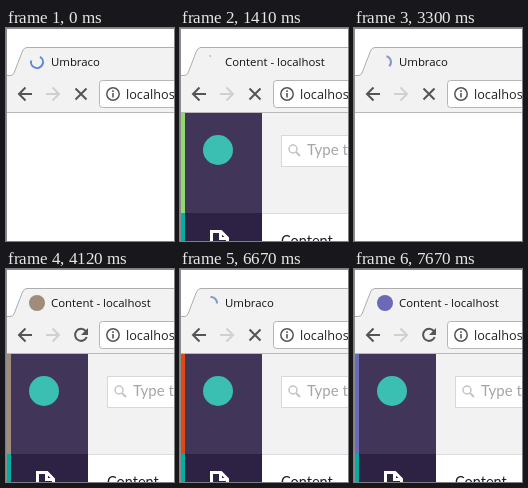
Animation, 168 px wide and 213 px high, one loop 8 s. Source, as an HTML page:

```html
<!DOCTYPE html>
<html lang="en">
<head>
<meta charset="utf-8">
<title>Tab colours</title>
<style>
html, body { margin: 0; width: 100%; height: 100%; overflow: hidden; background: #fff; }
svg { display: block; width: 168px; height: 213px; }
.ui { font-family: "Open Sans", "Noto Sans", sans-serif; }
.page { font-family: Lato, sans-serif; }
.line { fill: none; stroke-width: 2; }
</style>
</head>
<body>
<svg viewBox="0 0 168 213">
  <rect width="168" height="213" fill="#fff"/>

  <!-- browser tab and toolbar -->
  <path d="M1 47.5H4Q7 47.5 8 45L16.500 23Q18 19.500 21 19.500H169V85H1Z" fill="#f2f2f2"/>
  <path d="M1 47.500H4Q7 47.500 8 45L16.500 23Q18 19.500 21 19.500H169" fill="none" stroke="#adadad"/>
  <path d="M1 84.500H168" stroke="#b9b9b9"/>
  <circle id="favicon" cx="31" cy="34" r="8"/>
  <path id="spinner" class="line"/>
  <text id="title" class="ui" x="45" y="38" font-size="11.4" fill="#111"></text>

  <path class="line" d="M26 66H13.500M19.500 59.500L13 66L19.500 72.500" stroke="#555"/>
  <path class="line" d="M40 66H52.500M46.500 59.500L53 66L46.500 72.500" stroke="#d0d0d0"/>
  <path id="stop" class="line" d="M69.500 60.500L80.500 71.500M80.500 60.500L69.500 71.500" stroke="#555"/>
  <g id="reload">
    <path class="line" d="M79.700 62A6 6 0 1 0 80.700 68" stroke="#555"/>
    <path d="M82 59V66H75Z" fill="#555"/>
  </g>
  <rect x="93.500" y="52.500" width="90" height="27" rx="3" fill="#fff" stroke="#b5b5b5"/>
  <circle cx="107" cy="66" r="6.200" fill="none" stroke="#555" stroke-width="1.500"/>
  <path d="M107 65V69.500M107 62.300V64" stroke="#555" stroke-width="1.600"/>
  <text class="ui" x="120" y="70.500" font-size="12.7" fill="#222">localhost:61212</text>

  <!-- page, revealed in three stages -->
  <g class="page">
    <g id="part1">
      <rect x="82" y="85" width="86" height="100" fill="#f2f2f3"/>
      <path d="M82 185.500H168" stroke="#dcdce0"/>
      <rect x="1" y="85" width="81" height="128" fill="#413659"/>
      <rect id="stripe" x="1" y="85" width="4" height="128"/>
      <circle cx="38" cy="122" r="15" fill="#3bbfb2"/>
    </g>
    <g id="part2">
      <rect x="1" y="185" width="81" height="28" fill="#2d2144"/>
      <rect x="1" y="185" width="4" height="28" fill="#00aea2"/>
      <rect x="101.500" y="107.500" width="80" height="31" fill="#fff" stroke="#d8d7d9"/>
    </g>
    <g id="part3">
      <circle cx="113" cy="121" r="4" fill="none" stroke="#c4c4c8" stroke-width="1.500"/>
      <path d="M116 124L120 128" stroke="#c4c4c8" stroke-width="2"/>
      <text x="127" y="127" font-size="15" fill="#a5a5a8">Type to search</text>
      <path d="M31.500 214V203.500H41L47.500 210V214M40.500 203.500V210.500H47.500" fill="none" stroke="#fff" stroke-width="3"/>
      <text x="101" y="217.500" font-size="14.500" fill="#1d1d1d">Content</text>
    </g>
  </g>
  <path d="M0 .5H168M.5 0V213" fill="none" stroke="#8c8c8c"/>
</svg>
<script>
const LOOP = 8000;
const TITLES = { u: "Umbraco", l: "localhost:61212/umbraco", c: "Content - localhost" };
const COLOURS = {
  green: "#8fdc6c", blue: "#4291cf", tan: "#9f8c7a", orange: "#dd4a14", purple: "#6b69b8"
};
const WAIT = "#8799cb", LOAD = "#5a87dc";
// start angle, sweep, colour; index 0 means the icon is shown
const ARCS = [
  null,
  [-102, 8, WAIT],
  [-95, 100, WAIT],
  [-75, 120, WAIT],
  [-60, 255, LOAD],
  [30, 210, LOAD],
  [120, 120, LOAD]
];
// time, title, arc, page stage, colour
const STEPS = [
  [0, "u", 4, 0, "purple"],
  [150, "u", 5, 0, "purple"],
  [270, "u", 6, 0, "purple"],
  [420, "l", 0, 0, "purple"],
  [570, "c", 0, 1, "green"],
  [690, "c", 0, 2, "green"],
  [820, "c", 0, 3, "green"],
  [1410, "c", 1, 3, "green"],
  [1560, "u", 2, 0, "green"],
  [1690, "u", 3, 0, "green"],
  [1840, "u", 4, 0, "green"],
  [1990, "u", 5, 0, "green"],
  [2110, "l", 6, 0, "green"],
  [2240, "l", 0, 0, "green"],
  [2360, "c", 0, 1, "blue"],
  [2480, "c", 0, 2, "blue"],
  [2620, "c", 0, 3, "blue"],
  [3150, "c", 1, 3, "blue"],
  [3300, "u", 3, 0, "blue"],
  [3420, "u", 4, 0, "blue"],
  [3570, "u", 5, 0, "blue"],
  [3720, "l", 6, 0, "blue"],
  [3840, "l", 0, 0, "blue"],
  [3990, "c", 0, 1, "tan"],
  [4120, "c", 0, 3, "tan"],
  [4950, "c", 1, 3, "tan"],
  [5070, "u", 3, 0, "tan"],
  [5220, "u", 4, 0, "tan"],
  [5340, "u", 5, 0, "tan"],
  [5490, "u", 6, 0, "tan"],
  [5610, "l", 4, 0, "tan"],
  [5730, "l", 0, 0, "tan"],
  [5850, "l", 0, 0, "orange"],
  [5970, "c", 0, 1, "orange"],
  [6120, "c", 0, 3, "orange"],
  [6550, "c", 1, 3, "orange"],
  [6670, "u", 2, 3, "orange"],
  [6820, "u", 3, 0, "orange"],
  [6940, "u", 4, 0, "orange"],
  [7090, "l", 5, 0, "orange"],
  [7250, "l", 0, 0, "orange"],
  [7400, "c", 0, 1, "purple"],
  [7550, "c", 0, 2, "purple"],
  [7670, "c", 0, 3, "purple"]
];

const el = id => document.getElementById(id);
const show = (id, on) => el(id).style.display = on ? "" : "none";

function arcPath([start, sweep]) {
  const point = deg => {
    const a = deg * Math.PI / 180;
    return `${31 + 6 * Math.cos(a)} ${34 + 6 * Math.sin(a)}`;
  };
  return `M${point(start)}A6 6 0 ${sweep > 180 ? 1 : 0} 1 ${point(start + sweep)}`;
}

function render([, title, arc, stage, colour]) {
  el("title").textContent = TITLES[title];
  el("favicon").setAttribute("fill", COLOURS[colour]);
  el("stripe").setAttribute("fill", COLOURS[colour]);
  show("favicon", !arc);
  show("reload", !arc);
  show("spinner", arc);
  show("stop", arc);
  if (arc) {
    el("spinner").setAttribute("d", arcPath(ARCS[arc]));
    el("spinner").setAttribute("stroke", ARCS[arc][2]);
  }
  for (const n of [1, 2, 3]) show("part" + n, stage >= n);
}

let current;
const origin = performance.now();
function tick(now) {
  const t = Math.max(0, now - origin) % LOOP;
  const step = STEPS.findLast(s => s[0] <= t);
  if (step !== current) render(current = step);
  requestAnimationFrame(tick);
}
tick(origin);
</script>
</body>
</html>
```
